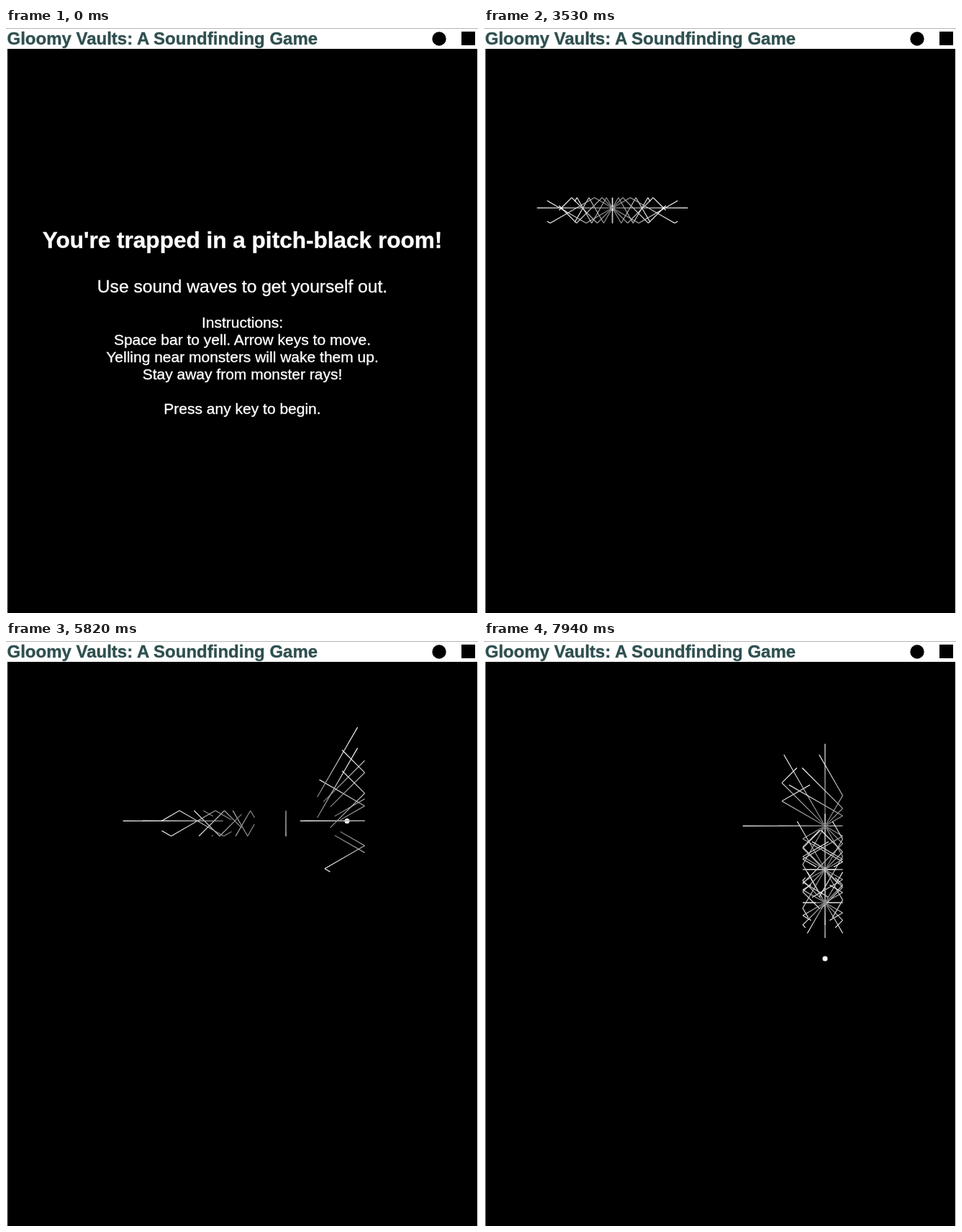
An HTML page with a canvas for the animation above (8 s loop, 656 px wide and 814 px high).

```html
<!DOCTYPE html>
<html lang="en">
<head>
<meta charset="utf-8">
<title>Gloomy Vaults</title>
<style>
  html, body { margin: 0; width: 100%; height: 100%; overflow: hidden; background: #fff; }
  canvas, svg { position: absolute; left: 0; top: 0; }
  text { font-family: "Liberation Sans", Arial, sans-serif; stroke-width: 0.35px; }
  #title { font-size: 24px; font-weight: bold; fill: #2f4f4f; stroke: #2f4f4f; }
  #intro { font-size: 21px; fill: #fff; stroke: #fff; text-anchor: middle; }
  #intro .head { font-size: 31.55px; font-weight: bold; }
  #intro .sub { font-size: 24.6px; }
</style>
</head>
<body>
<canvas id="room" width="656" height="814"></canvas>
<svg width="656" height="814">
  <rect width="656" height="1" fill="#b4b4b4"/>
  <text id="title" x="1.5" y="23">Gloomy Vaults: A Soundfinding Game</text>
  <circle cx="602" cy="15" r="9.7"/>
  <rect x="633" y="5" width="19" height="19"/>
  <g id="intro">
    <text class="head" x="328.5" y="306">You're trapped in a pitch-black room!</text>
    <text class="sub" x="328.5" y="368">Use sound waves to get yourself out.</text>
    <text x="328.5" y="417">Instructions:</text>
    <text x="328.5" y="441">Space bar to yell. Arrow keys to move.</text>
    <text x="328.5" y="465">Yelling near monsters will wake them up.</text>
    <text x="328.5" y="489">Stay away from monster rays!</text>
    <text x="328.5" y="537">Press any key to begin.</text>
  </g>
</svg>
<script>
const LOOP = 8000, START = 1180, TICK = 1000 / 17, TICK_ORIGIN = 1940;
const WALK_SPEED = 0.29, SOUND_SPEED = 0.177;    // px per ms
const TRAIL = 112, REACH = 211;                  // px along a ray
const MAX_SEGMENTS = 4, WEAK_AT = 204, WEAK_SEGMENTS = 2;

// A corridor that opens on the right into a shaft, wider above than below.
const corridor = { left: 54, top: 236, bottom: 271.5 };
const shaft = { upperLeft: 414, lowerLeft: 443, right: 498.5, top: 49, bottom: 640 };
const corners = [
  [corridor.left, corridor.top], [shaft.upperLeft, corridor.top],
  [shaft.upperLeft, shaft.top], [shaft.right, shaft.top],
  [shaft.right, shaft.bottom], [shaft.lowerLeft, shaft.bottom],
  [shaft.lowerLeft, corridor.bottom], [corridor.left, corridor.bottom]
];
const walls = corners.map((c, i) => [c, corners[(i + 1) % corners.length]]);

const home = { x: 74.5, y: 250.4 };
const walks = [
  { at: 1570, x: 128.5 }, { at: 1925, x: 107 }, { at: 2680, x: 178.5 }, { at: 3570, x: 267 },
  { at: 4275, x: 389 }, { at: 4940, x: 474 }, { at: 7270, y: 442 }
];
const yells = [2000, 2936, 3885, 4338, 4520, 4579, 4638, 4697, 5863, 7294, 7503, 7662];
const angles = [0, 90, 180, 270].flatMap(q => [0, 30, 45, 60].map(a => q + a));

function playerAt(t) {
  const pos = { ...home };
  for (const { at, ...goal } of walks) {
    const budget = Math.max(0, t - at) * WALK_SPEED;
    for (const axis in goal) {
      const gap = goal[axis] - pos[axis];
      pos[axis] += Math.sign(gap) * Math.min(Math.abs(gap), budget);
    }
  }
  return pos;
}

function nearestHit(x, y, dx, dy) {
  let best = { dist: Infinity };
  for (const [a, b] of walls) {
    const vertical = a[0] === b[0];
    const dist = vertical ? (a[0] - x) / dx : (a[1] - y) / dy;
    if (!(dist > 1e-6) || dist >= best.dist) continue;
    const along = vertical ? 1 : 0;
    const at = vertical ? y + dy * dist : x + dx * dist;
    if (at >= Math.min(a[along], b[along]) && at <= Math.max(a[along], b[along]))
      best = { dist, vertical };
  }
  return best;
}

function traceRay({ x, y }, degrees) {
  let dx = Math.cos(degrees * Math.PI / 180), dy = Math.sin(degrees * Math.PI / 180);
  const segments = [];
  let start = 0;
  while (segments.length < MAX_SEGMENTS && start < REACH) {
    const { dist, vertical } = nearestHit(x, y, dx, dy);
    const length = Math.min(dist, REACH);
    segments.push({ x, y, dx, dy, start, end: start + length });
    x += dx * length;
    y += dy * length;
    start += length;
    if (vertical) dx = -dx; else dy = -dy;
  }
  return segments;
}

const waves = yells.map(born => {
  const origin = playerAt(born);
  return { born, rays: angles.map(a => traceRay(origin, a)) };
});

const ctx = document.getElementById('room').getContext('2d');
const intro = document.getElementById('intro');

function drawRay(segments, head) {
  const tail = Math.max(0, head - TRAIL);
  const shade = d => {
    const v = Math.round(130 + 125 * (d - tail) / (head - tail));
    return `rgb(${v},${v},${v})`;
  };
  // A wave near its end has lost its later echoes.
  const audible = head > WEAK_AT ? WEAK_SEGMENTS : MAX_SEGMENTS;
  for (const s of segments.slice(0, audible)) {
    const from = Math.max(tail, s.start), to = Math.min(head, s.end);
    if (to <= from) continue;
    const point = d => [s.x + s.dx * (d - s.start), s.y + s.dy * (d - s.start)];
    const a = point(from), b = point(to);
    const gradient = ctx.createLinearGradient(...a, ...b);
    gradient.addColorStop(0, shade(from));
    gradient.addColorStop(1, shade(to));
    ctx.strokeStyle = gradient;
    ctx.beginPath();
    ctx.moveTo(...a);
    ctx.lineTo(...b);
    ctx.stroke();
  }
}

function draw(time) {
  const fadeStep = Math.floor((time - START) / 55) + 1;
  intro.style.opacity = Math.min(1, Math.max(0, 1 - fadeStep / 3));
  ctx.fillStyle = '#000';
  ctx.fillRect(2, 29, 653, 785);
  if (time < START) return;

  const t = TICK_ORIGIN + TICK * Math.floor((time + 5 - TICK_ORIGIN) / TICK);
  const { x, y } = playerAt(t);
  ctx.fillStyle = '#fff';
  ctx.beginPath();
  ctx.arc(x, y, 3.5, 0, Math.PI * 2);
  ctx.fill();

  ctx.lineWidth = 1.15;
  for (const { born, rays } of waves) {
    const head = (t - born) * SOUND_SPEED;
    if (head > 0 && head <= REACH) rays.forEach(ray => drawRay(ray, head));
  }
}

const begin = performance.now();
function tick() {
  draw((performance.now() - begin) % LOOP);
  requestAnimationFrame(tick);
}
tick();
</script>
</body>
</html>
```
